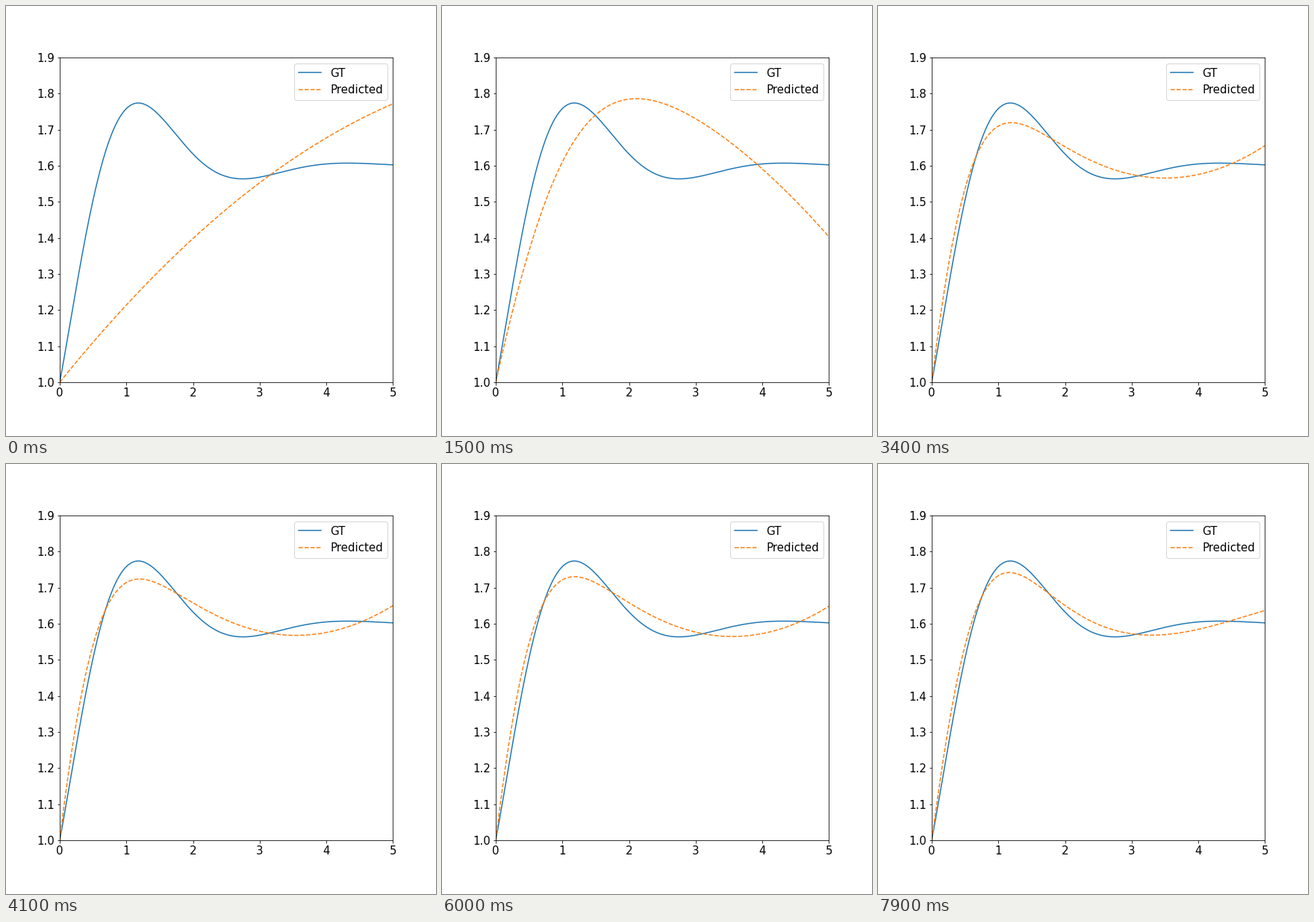
Write a matplotlib script that moves like this. It is 576x576 px and loops after 8 s.

```python
import numpy as np
import matplotlib.pyplot as plt
from matplotlib.animation import FuncAnimation
from numpy.polynomial.polynomial import polyval

FRAMES, STEP = 80, 100
T_END = 5

plt.rcParams.update({"font.family": "DejaVu Sans", "font.size": 15})
t = np.linspace(0, T_END, 500)


def truth():
    """Damped oscillator x'' + 2x' + 5x = 8 with x(0) = x'(0) = 1."""
    return 1.6 + np.exp(-t) * (.2 * np.sin(2 * t) - .6 * np.cos(2 * t))


def fit(tail, a, b):
    """Rise from 1 onto a polynomial tail; the gap decays as exp(-at - bt^2)."""
    return 1 + polyval(t, tail) - tail[0] * np.exp(-a * t - b * t ** 2)


# Stages of training by time in ms.
stages = {
    0: fit((0, .2294, -.015), 1, 0),
    800: fit((.158, .4305, -.087), 1, .4),
    1200: fit((.873, .045, -.03), .8, .32),
    2300: fit((1.01, -.092), 1.15, .11),
    3400: fit((1.056, -.28, .04), 1.7, .6),
    4900: fit((1.0625, -.2736, .038), 1.74, .55),
    6000: fit((1.069, -.284, .04), 1.69, .65),
    7900: fit((1.332, -.564, .1315, -.0093), 1.46, .68),
}
times, curves = list(stages), list(stages.values())


def predicted(ms):
    pos = np.interp(ms, times, range(len(times)))
    k = min(int(pos), len(times) - 2)
    return curves[k] + (pos - k) * (curves[k + 1] - curves[k])


fig, ax = plt.subplots(figsize=(8, 8), dpi=72, facecolor="white")
fig.subplots_adjust(left=.125, right=.9, bottom=.125, top=.88)
ax.plot(t, truth(), color="C0", lw=1.5, label="GT")
line, = ax.plot(t, predicted(0), "--", color="C1", lw=1.5, label="Predicted")
ax.set(xlim=(0, T_END), ylim=(1, 1.9),
       xticks=range(6), yticks=np.linspace(1, 1.9, 10))
ax.yaxis.set_major_formatter("{x:.1f}")
ax.legend(loc="upper right")


def update(i):
    line.set_ydata(predicted(i * STEP))
    return line,


anim = FuncAnimation(fig, update, frames=FRAMES, interval=STEP,
                     repeat=True, repeat_delay=0)
plt.show()
```
